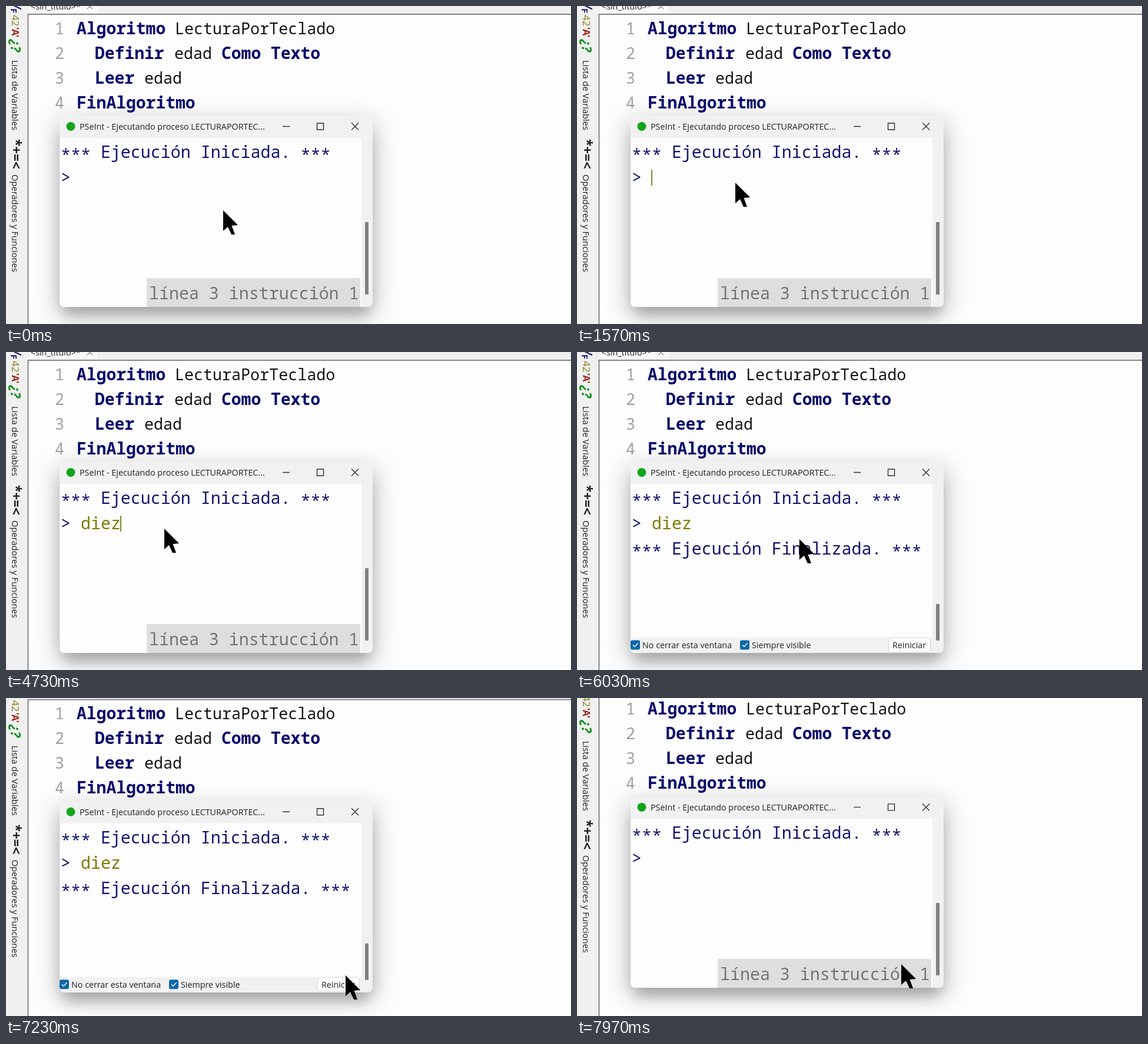
Animation of 960x540 px, one loop 8000 ms. Source, as an HTML page:

```html
<!DOCTYPE html>
<html lang="es">
<head>
<meta charset="utf-8">
<style>
html, body { margin: 0; width: 100%; height: 100%; overflow: hidden; background: #fdfdfd; }
svg { display: block; width: 960px; height: 540px; }
text { white-space: pre; }
.ui { font: 14.3px "Open Sans", "Noto Sans", sans-serif; fill: #202020; }
.mono { font: 28.3px "Noto Sans Mono", monospace; fill: #141470; }
.code { font: 26.7px "Noto Sans Mono", monospace; fill: #141414; }
.key { font-size: 28px; font-weight: 600; fill: #08086c; }
.num { fill: #a0a0a0; }
.line { fill: none; stroke: #303030; stroke-width: 1.4; }
.side { font-size: 14.7px; }
.sign { font: bold 18px "Open Sans", sans-serif; }
</style>
</head>
<body>
<svg viewBox="0 0 960 540">
  <defs>
    <filter id="glow" x="-20%" y="-30%" width="140%" height="160%"><feGaussianBlur stdDeviation="19"/></filter>
    <filter id="shade" x="-20%" y="-30%" width="140%" height="160%"><feGaussianBlur stdDeviation="11"/></filter>
  </defs>
  <rect width="960" height="540" fill="#fdfdfd"/>
  <g id="page">
    <rect y="-10" width="960" height="23" fill="#f0f0f0"/>
    <rect x="39" y="-10" width="117" height="23" fill="#f9f9f9"/>
    <text class="ui" x="42" y="6">&lt;sin_titulo&gt;*</text>
    <path class="line" d="M138-4l9 9m0-9l-9 9" style="stroke:#8c8c8c"/>
    <rect y="-10" width="37" height="600" fill="#f0f0f0"/>
    <path d="M960 14H37.5V590" fill="none" stroke="#858585" stroke-width="2"/>
    <g id="side" transform="translate(10 0) rotate(90)"></g>
    <g id="code"></g>

    <rect x="86" y="196" width="542" height="328" rx="12" fill="#888" opacity=".5" filter="url(#glow)"/>
    <rect x="98" y="220" width="519" height="304" rx="10" fill="#808080" opacity=".5" filter="url(#shade)"/>
    <rect x="91" y="186" width="532" height="325" rx="8" fill="#f1f1f1"/>
    <path d="M92 224H604V511H99Q92 511 92 504Z" fill="#fdfdfd"/>
    <circle cx="110" cy="204.500" r="7.500" fill="#12a51a"/>
    <text class="ui" id="title" x="125" y="210">PSeInt - Ejecutando proceso LECTURAPORTEC...</text>
    <path class="line" d="M470 204.500h12M528.500 199h11v11h-11zM587 198.500l12 12m0-12l-12 12"/>
    <rect id="thumb" x="610" width="6" rx="1" fill="#808080"/>
    <g id="out"></g>
    <text class="mono" id="typed" x="127" y="301" style="fill:#7c7c00"></text>
    <rect id="caret" y="278" width="2" height="27" fill="#84842c"/>

    <g id="running">
      <rect x="239" y="462" width="363" height="49" fill="#dedede"/>
      <text class="mono" x="243" y="498" style="fill:#747474">línea 3 instrucción 1</text>
    </g>
    <g id="done">
      <path d="M91 485H610V511H99Q91 511 91 503Z" fill="#f1f1f1"/>
      <g id="checks"></g>
      <rect x="529.500" y="485.500" width="71" height="24" rx="3" fill="#fdfdfd" stroke="#d8d8d8"/>
      <text class="ui" x="536" y="503">Reiniciar</text>
    </g>
  </g>
  <path id="mouse" d="M0 0V35L8 28L14 41H20L14.500 26L25 25Z"/>
</svg>
<script>
const $ = id => document.getElementById(id);
const esc = s => s.replace(/</g, '&lt;').replace(/>/g, '&gt;');
const label = (cls, x, y, s, style = '') =>
  `<text class="${cls}" x="${x}" y="${y}" style="${style}">${esc(s)}</text>`;

// Rotated side panel: x runs down the stage
$('side').innerHTML =
  label('sign', -5, -3, 'V', 'fill:#202070;font-size:17px;font-style:italic') +
  label('sign', 4, 2, 'F', 'fill:#202070;font-size:15px') +
  label('ui', 15, 0, '42', 'fill:#808010;font-size:17px') +
  label('sign', 36, 0, "'A'", 'fill:#9c2418;font-size:16px') +
  label('sign', 57, 2, '¿?', 'fill:#149020;font-size:23px;font-style:italic') +
  label('ui side', 92, 0, 'Lista de Variables') +
  label('sign', 226, 1, '*+=<', 'font-size:22.500px;fill:#202020') +
  label('ui side', 286, 0, 'Operadores y Funciones');

const code = [
  [[120, 'Algoritmo', 1], [287, 'LecturaPorTeclado']],
  [[151, 'Definir', 1], [286, 'edad'], [366, 'Como', 1], [450, 'Texto', 1]],
  [[151, 'Leer', 1], [235, 'edad']],
  [[120, 'FinAlgoritmo', 1]]
];
$('code').innerHTML = code.map((row, i) => {
  const y = 47.5 + 42 * i;
  return label('code num', 83, y, String(i + 1)) +
    row.map(([x, s, key]) => label(key ? 'code key' : 'code', x, y, s)).join('');
}).join('');

// Console lines, with the stars lowered to mid height
const notice = (id, y, s) => `<text class="mono" id="${id}" x="93" y="${y}"><tspan dy="5">***</tspan>` +
  `<tspan dy="-5"> ${s} </tspan><tspan dy="5">***</tspan></text>`;
$('out').innerHTML = notice('begin', 258, 'Ejecución Iniciada.') +
  label('mono', 93, 301, '>') + notice('end', 344, 'Ejecución Finalizada.');

$('checks').innerHTML = [[91, 'No cerrar esta ventana'], [277, 'Siempre visible']].map(([x, s]) =>
  `<rect x="${x}" y="489.500" width="16" height="16" rx="3" fill="#0c68a8"/>
   <path d="M${x + 4} 497.500l3 3l5.500-6" fill="none" stroke="#fff" stroke-width="1.4"/>` +
  label('ui', x + 20, 503, s)).join('');

const LOOP = 8000, ENTER = 5150, RESTART = 7500;
const KEYS = [3300, 3850, 4250, 4650];
const ease = (t, a, b) => {
  const u = Math.min(1, Math.max(0, (t - a) / (b - a)));
  return u * u * (3 - 2 * u);
};
const mix = (a, b, s) => a + (b - a) * s;

function mouseAt(t) {
  if (t < 5520) {
    const s = ease(t, 150, 950);
    return [mix(369, 269, s), mix(347, 300, s)];
  }
  if (t < 7600) {
    const s = ease(t, 5520, 6700);
    return [[269, 393, 577], [300, 280, 471]].map(([a, c, b]) => mix(mix(a, c, s), mix(c, b, s), s));
  }
  const s = ease(t, 7600, 7970);
  return [mix(577, 551, s), mix(471, 452, s)];
}

const show = (id, on) => $(id).setAttribute('visibility', on ? 'visible' : 'hidden');

function draw(t) {
  const done = t >= ENTER && t < RESTART;
  const count = t < RESTART ? KEYS.filter(k => t >= k).length : 0;
  const scroll = t < 6130 ? 0 : 9.7 * (1 - Math.cos(Math.PI * (t - 6130) / 2000));
  $('page').setAttribute('transform', `translate(0 ${-scroll})`);
  $('mouse').setAttribute('transform', `translate(${mouseAt(t)})`);
  $('typed').textContent = 'diez'.slice(0, count);
  $('caret').setAttribute('x', 126 + 17 * count);
  show('caret', t < ENTER && (t + 1020) % 1060 < 530);
  show('running', !done);
  show('done', done);
  show('end', done);
  $('thumb').setAttribute('y', done ? 428 : 367);
  $('thumb').setAttribute('height', done ? 62 : 123);
}

function frame() {
  draw(performance.now() % LOOP);
  requestAnimationFrame(frame);
}
draw(0);
frame();
</script>
</body>
</html>
```
